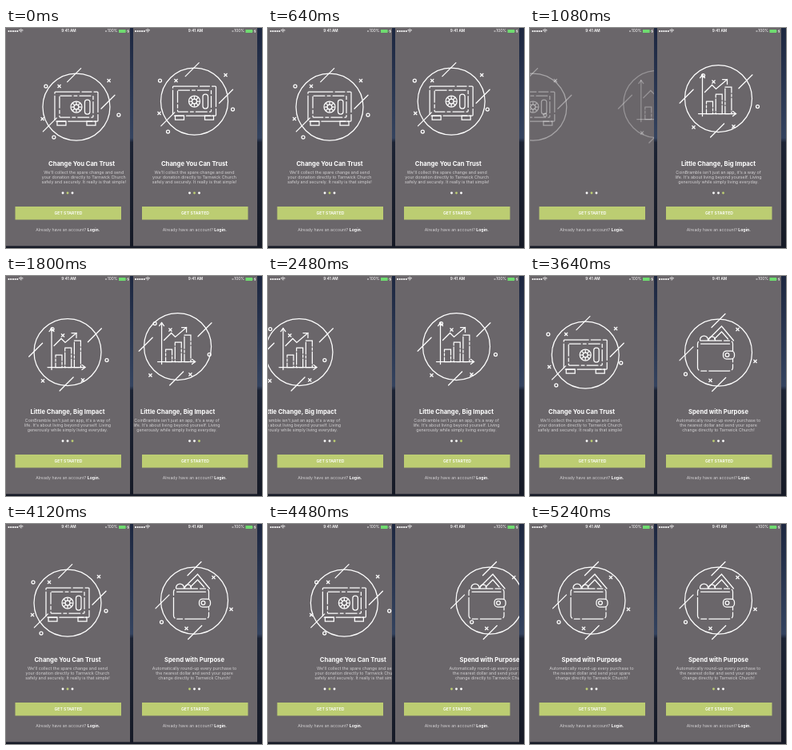
Animation, 320 px wide and 276 px high, one loop 5360 ms. Source, as an HTML page with a canvas:

```html
<!DOCTYPE html>
<html lang="en">
<head>
<meta charset="utf-8">
<title>Onboarding carousel</title>
<style>
html, body { margin: 0; width: 100%; height: 100%; overflow: hidden; background: #1a2030; }
canvas { display: block; width: 320px; height: 276px; }
</style>
</head>
<body>
<canvas id="stage"></canvas>
<script>
const LOOP = 5360, STEP = 40, PAGE = 155, CENTER = 77, RADIUS = 42;
const SWIPE = 530, PULL = 720, PULL_DEPTH = 0.27;
const GRAY = '#6a666a', GREEN = '#bccd72', WHITE = '#fff', PALE = '#d2d0d2';
const FONT = 'Inter, Lato, sans-serif';
const canvas = document.getElementById('stage');
const ctx = canvas.getContext('2d');
const ratio = window.devicePixelRatio || 1;
canvas.width = 320 * ratio;
canvas.height = 276 * ratio;

// Middle times of the swipes (two forward, two back) and of the pulls past an end
const phones = [
  { x: 0, dx: 0, lift: 0, swipes: [-127, 1085, 3498, 4581], pulls: [2410] },
  { x: 159, dx: 158.5, lift: 7, swipes: [-300, 790, 2790, 3340], pulls: [1980, 4500] }
];

// Slanted strokes sit on the rim at the given angles
const pages = [
  { title: 'Spend with Purpose',
    body: ['Automatically round-up every purchase to', 'the nearest dollar and send your spare', 'change directly to Tarnwick Church!'],
    icon: drawWallet, y: 96,
    strokes: [-90, 89, 178],
    crosses: [[46, 11], [-10, 35], [24, -29]],
    rings: [[-41, 27]] },
  { title: 'Change You Can Trust',
    body: ["We'll collect the spare change and send", 'your donation directly to Tarnwick Church', 'safely and securely. It really is that simple!'],
    icon: drawSafe, y: 99,
    strokes: [-94, -9, 146],
    crosses: [[-23, -26], [39, -33], [-44, 15]],
    rings: [[-43, -26], [48, 10], [-33, 38]] },
  { title: 'Little Change, Big Impact',
    body: ["CoinBramble isn't just an app, it's a way of", "life. It's about living beyond yourself. Living", 'generously while simply living everyday.'],
    icon: drawChart, y: 95.5,
    strokes: [-32, 184, 92],
    crosses: [[-6, -21], [-31, 36], [19, 35]],
    rings: [[-19, -29], [49, 10]] }
];

const clamp = (v, max = 1) => Math.max(0, Math.min(max, v));
const ease = u => u < 0.5 ? 4 * u ** 3 : 1 - 4 * (1 - u) ** 3;
const progress = (t, mid, span) => clamp((t - mid) / span + 0.5);

function scrollAt({ swipes, pulls }, t) {
  const page = swipes.reduce((sum, mid, i) =>
    sum + (i < 2 ? 1 : -1) * ease(progress(t, mid, SWIPE)), 0);
  const pull = pulls.reduce((sum, mid) =>
    sum + Math.sin(Math.PI * progress(t, mid, PULL)) ** 2, 0);
  return { page, over: pull * PULL_DEPTH * (page > 1 ? 1 : -1) };
}

function path(...points) {
  ctx.beginPath();
  for (let i = 0; i < points.length; i += 2) ctx.lineTo(points[i], points[i + 1]);
  ctx.stroke();
}

function slash(x, y, half, slope = -1) {
  path(x - half, y - half * slope, x + half, y + half * slope);
}

function circle(x, y, r, fill) {
  ctx.beginPath();
  ctx.arc(x, y, r, 0, Math.PI * 2);
  if (fill) { ctx.fillStyle = fill; ctx.fill(); } else ctx.stroke();
}

function box(x, y, w, h, r = 0, dash = [], fill) {
  ctx.setLineDash(dash);
  ctx.beginPath();
  ctx.roundRect(x, y, w, h, r);
  if (fill) { ctx.fillStyle = fill; ctx.fill(); }
  ctx.stroke();
  ctx.setLineDash([]);
}

function text(str, x, y, size, weight = 400, color = WHITE, align = 'center') {
  ctx.font = `${weight} ${size}px ${FONT}`;
  ctx.fillStyle = color;
  ctx.textAlign = align;
  ctx.textBaseline = 'middle';
  ctx.fillText(str, x, y);
}

function drawSafe() {
  box(-27, -19, 54, 37, 1, [30, 3, 12, 3]);
  box(-21, -14, 42, 27, 1, [14, 3, 4, 3]);
  for (const side of [-1, 1]) box(side * 18.5 - 5.5, 18, 11, 5);
  box(10.5, -9, 6.5, 18, 3);
  circle(0, 0, 7);
  circle(0, 0, 3);
  for (let i = 0; i < 8; i++) {
    const c = Math.cos(i * Math.PI / 4), s = Math.sin(i * Math.PI / 4);
    path(3 * c, 3 * s, 6 * c, 6 * s);
  }
}

function drawChart() {
  path(-20, 22, -20, -30);
  path(-23, -26, -20, -30, -17, -26);
  path(-25, 19, 22, 19);
  path(18, 16, 22, 19, 18, 22);
  for (let i = 0; i < 3; i++) {
    const top = 3.5 - 9 * i;
    box(-15 + 11.7 * i, top, 8, 19 - top, 0, [15, 2, 3, 2]);
  }
  path(-17, -8, -8, -17, -3, -12, 11, -24);
  path(5, -24, 11, -24, 11, -18);
}

function drawWallet() {
  circle(-18, -16, 5);
  circle(-8, -16, 4);
  path(-12, -17, 4, -33, 19, -15);
  path(-5, -17, 4, -26, 12, -17);
  box(-26, -15, 44, 38, 4, [26, 3, 7, 3], GRAY);
  path(-22, -11, 14, -11);
  box(6, -2, 14, 10, 4, [], GRAY);
  circle(11, 3, 2.4);
}

function drawPage(phone, index, { page, over }) {
  const offset = index - page, away = Math.abs(offset);
  if (away > 1) return;
  const { title, body, icon, y, strokes, crosses, rings } = pages[index];
  const center = CENTER + phone.dx;
  const shift = (rate, pull = 1) => PAGE * (offset * rate - over * pull);
  const drift = rate => shift(rate, rate) - shift(1);

  ctx.save();
  ctx.globalAlpha = clamp(1.3 - 1.9 * away);
  ctx.strokeStyle = WHITE;
  ctx.lineWidth = 1.25;
  ctx.lineCap = 'round';
  ctx.translate(center + shift(1), y - (index ? phone.lift : 0));
  circle(0, 0, RADIUS);
  icon();
  for (const deg of strokes) {
    const a = deg * Math.PI / 180;
    slash(40 * Math.cos(a), 40 * Math.sin(a), 8.5);
  }
  for (const [x, y] of crosses) {
    for (const slope of [-1, 1]) slash(x + drift(1.15), y, 1.7, slope);
  }
  for (const [x, y] of rings) circle(x + drift(1.45), y, 2);
  ctx.restore();

  ctx.save();
  ctx.globalAlpha = clamp(1.3 - 2.7 * away);
  text(title, center + shift(1.6), 171, 7.65, 700);
  body.forEach((line, i) =>
    text(line, center + shift(1.85, 1.05), 181.5 + i * 5.8, 5.3, 400, PALE));
  ctx.restore();
}

function drawStatus() {
  for (let i = 0; i < 5; i++) circle(3.5 + i * 2.7, 4, 1.1, WHITE);
  ctx.strokeStyle = WHITE;
  ctx.lineWidth = 0.8;
  for (const r of [1, 2.5, 4]) {
    ctx.beginPath();
    ctx.arc(18.7, 5.8, r, -2.35, -0.8);
    ctx.stroke();
  }
  text('9:41 AM', 78.5, 4, 4.7, 600);
  ctx.fillStyle = '#aaa8aa';
  ctx.fillRect(124, 3, 2, 2);
  text('100%', 139.5, 4, 4.8, 400, WHITE, 'right');
  ctx.fillStyle = '#6fdc70';
  ctx.fillRect(141, 2, 8.5, 4);
  ctx.fillRect(150, 3.2, 0.7, 1.6);
  path(153, 2, 152, 4, 153.4, 4, 152.4, 6);
}

function drawPhone(phone, t) {
  const scroll = scrollAt(phone, t);
  ctx.save();
  ctx.beginPath();
  ctx.rect(phone.x, 0, PAGE, 273.5);
  ctx.clip();
  ctx.fillStyle = GRAY;
  ctx.fillRect(phone.x, 0, PAGE, 274);
  pages.forEach((_, i) => drawPage(phone, i, scroll));

  ctx.translate(phone.dx, 0);
  drawStatus();
  const active = Math.round(scroll.page);
  for (let i = 0; i < 3; i++) circle(71 + i * 6, 207, 1.45, i === active ? GREEN : WHITE);
  ctx.fillStyle = GREEN;
  ctx.fillRect(11.5, 224, 132.5, 16.5);
  text('GET STARTED', 78, 232.5, 5.1, 600);
  text('Already have an account?', 100.5, 253, 5.2, 400, PALE, 'right');
  text('Login.', 117.5, 253, 5.2, 700, WHITE, 'right');
  ctx.restore();
}

function drawBackdrop() {
  const sky = ctx.createLinearGradient(0, 0, 0, 276);
  sky.addColorStop(0, '#1d2740');
  sky.addColorStop(0.5, '#34435f');
  sky.addColorStop(0.52, '#1c2334');
  sky.addColorStop(1, '#161a26');
  ctx.fillStyle = sky;
  ctx.fillRect(0, 0, 320, 276);
}

function frame() {
  const t = Math.floor(performance.now() % LOOP / STEP) * STEP;
  ctx.setTransform(ratio, 0, 0, ratio, 0, 0);
  drawBackdrop();
  phones.forEach(phone => drawPhone(phone, t));
  requestAnimationFrame(frame);
}
frame();
</script>
</body>
</html>
```
